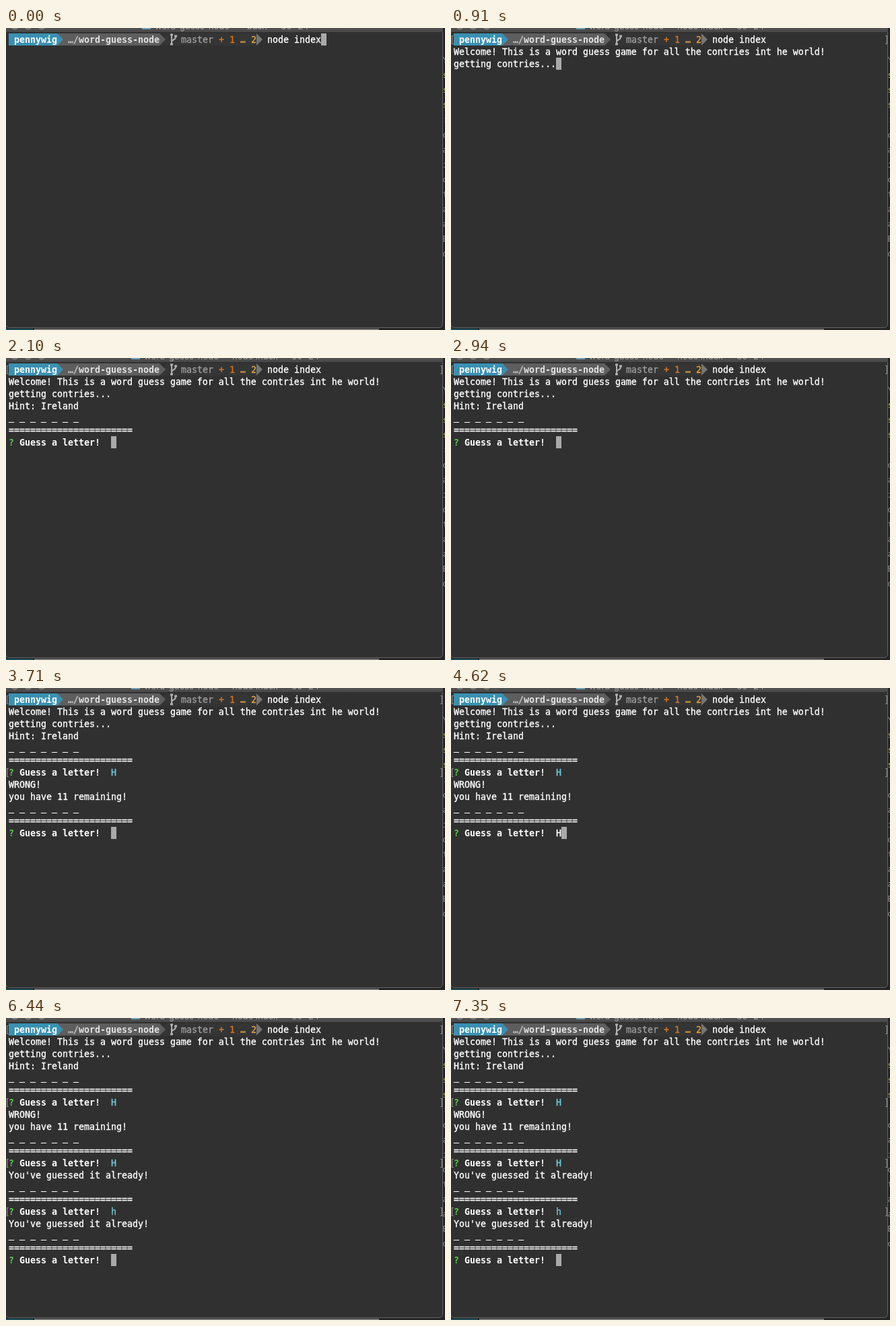
Recreate the animation shown at these times as an HTML page. Size 652x448 px, loop 7420 ms.

```html
<!DOCTYPE html>
<html lang="en">
<head>
<meta charset="utf-8">
<title>Word guess in a terminal</title>
<style>
  html, body { margin: 0; width: 100%; height: 100%; overflow: hidden; background: #242424; }
  #stage { position: relative; width: 652px; height: 448px; overflow: hidden; }
  svg { position: absolute; left: 0; top: 0; }
  .row {
    position: absolute;
    height: 18px;
    font: 13.29px/18px "DejaVu Sans Mono", "Liberation Mono", monospace;
    color: #fff;
    white-space: pre;
    -webkit-text-stroke: 0.35px;
  }
  .mark { color: #8c8c8c; -webkit-text-stroke: 0; }
  .title { font: 13px Inter, "Liberation Sans", sans-serif; fill: #a6a6a6; }
  .behind { font: 13px "DejaVu Sans Mono", monospace; fill: #858585; }
  .behind .key { fill: #aaa548; }
  b { font-weight: bold; -webkit-text-stroke: 0; }
  .blanks { position: relative; top: -2px; }
  .ask { color: #5fc750; }
  .done { color: #72c5d4; }
  .path { color: #c4c4c4; }
  .path b { color: #e2e2e2; }
  .git { color: #9c9c9c; }
  .add { color: #cb742a; }
  .new { color: #e6a63e; }
  #cursor { position: absolute; width: 8px; height: 18px; background: #a9a9a9; }
</style>
</head>
<body>
<div id="stage">
  <svg width="652" height="448" viewBox="0 0 652 448">
    <defs>
      <linearGradient id="bar" x2="0" y2="1">
        <stop stop-color="#525252"/><stop offset="1" stop-color="#484848"/>
      </linearGradient>
    </defs>
    <!-- window behind -->
    <rect width="652" height="448" fill="#242424"/>
    <g class="behind" id="behind"></g>
    <rect y="446" width="40" height="2" fill="#1d4c59"/>
    <rect x="42" y="446" width="512" height="2" fill="#747474"/>
    <!-- terminal window -->
    <path d="M-1-1H648.5V439.5a5 5 0 0 1-5 5H4.5a5 5 0 0 1-5-5Z" fill="#303030" stroke="#646464"/>
    <rect width="649" height="6" fill="url(#bar)"/>
    <g fill="#707070" stroke="#8b8b8b">
      <circle cx="13" cy="-4" r="6"/><circle cx="33" cy="-4" r="6"/><circle cx="53" cy="-4" r="6"/>
    </g>
    <g data-to="350">
      <rect x="202" y="-8" width="13" height="10" fill="#6f9fb6"/>
      <text class="title" x="221" y="2">word-guess-node — -bash — 80×24</text>
    </g>
    <g data-from="350">
      <rect x="186" y="-8" width="13" height="10" fill="#6f9fb6"/>
      <text class="title" x="205" y="2">word-guess-node — node index — 80×24</text>
    </g>
    <!-- prompt segments -->
    <path d="M237 8H372V26H229Z" fill="#353535"/>
    <path d="M372 8L381 17L372 26Z" fill="#757575"/>
    <path d="M76 8H228L237 17L228 26H76Z" fill="#5e5e5e"/>
    <path d="M4 8H76L85 17L76 26H4Z" fill="#3a90b2"/>
    <g fill="none" stroke="#b0b0b0" stroke-width="2">
      <path d="M246 9V25M246 21C246 16 252 19 252 13"/>
      <path d="M244 10H248M244 24H248M250 12H254" stroke-width="3"/>
    </g>
  </svg>
  <div id="cursor"></div>
  <div id="term"></div>
</div>
<script>
const LOOP = 7420, CELL = 8, LINE = 18, LEFT = 4, TOP = 8;
const ENTER = 350, WELCOME = 910, HINT = 1750;
const term = document.getElementById('term');
const cursor = document.getElementById('cursor');
const stops = [];

// Text sits one pixel below the top of its cell.
function put(x, row, html, from = 0, to = LOOP, kind = '') {
  const el = document.createElement('div');
  el.className = 'row ' + kind;
  el.style.left = x + 'px';
  el.style.top = TOP + 1 + LINE * row + 'px';
  el.innerHTML = html;
  el.dataset.from = from;
  el.dataset.to = to;
  term.append(el);
}
const print = (col, row, html, from, to) => put(LEFT + col * CELL, row, html, from, to);
const moveCursor = (time, col, row) => stops.push({ time, col, row });

function bracket(row, from) {
  put(-2, row, '[', from, LOOP, 'mark');
  put(643, row, ']', from, LOOP, 'mark');
}

// Blanks, rule and question; returns the row of the question.
function ask(row, time) {
  print(0, row, '<span class="blanks">_ _ _ _ _ _ _</span>', time);
  print(0, row + 1, '='.repeat(23), time);
  print(0, row + 2, '<b><span class="ask">?</span> Guess a letter!</b>', time);
  moveCursor(time, 19, row + 2);
  return row + 2;
}

function answer(row, letter, typed, sent, reply) {
  print(19, row, letter, typed, sent);
  moveCursor(typed, 20, row);
  print(19, row, `<span class="done">${letter}</span>`, sent);
  bracket(row, sent);
  reply.forEach((text, i) => print(0, row + 1 + i, text, sent));
  return ask(row + 1 + reply.length, sent);
}

print(1, 0, '<b>pennywig</b>');
print(11, 0, '<span class="path">…/<b>word-guess-node</b></span>');
print(32, 0, '<span class="git">master</span> <b class="add">+</b> <span class="add">1</span> <b class="new">…</b> <span class="new">2</span>');
print(48, 0, 'node index');
moveCursor(0, 58, 0);
bracket(0, ENTER);
moveCursor(ENTER, 0, 1);
print(0, 1, 'Welcome! This is a word guess game for all the contries int he world!', WELCOME);
print(0, 2, 'getting contries...', WELCOME);
moveCursor(WELCOME, 19, 2);
print(0, 3, 'Hint: Ireland', HINT);

const again = ["You've guessed it already!"];
let row = ask(4, HINT);
row = answer(row, 'H', 3080, 3430, ['WRONG!', 'you have 11 remaining!']);
row = answer(row, 'H', 4130, 4830, again);
answer(row, 'h', 5670, 6230, again);

// Slivers of text at the right edge.
document.getElementById('behind').innerHTML = [...'Ysss:oaidtaaBd'].map((c, i) =>
  `<text x="648.5" y="${52 + i * 22.1}"${c === 's' ? ' class="key"' : ''}>${c}</text>`).join('');

const timed = [...document.querySelectorAll('[data-from], [data-to]')].map(el => ({
  el, from: +(el.dataset.from || 0), to: +(el.dataset.to || LOOP)
}));

function draw() {
  const t = performance.now() % LOOP;
  for (const { el, from, to } of timed)
    el.style.visibility = t >= from && t < to ? 'visible' : 'hidden';
  const at = stops.filter(s => s.time <= t).pop();
  cursor.style.left = LEFT + at.col * CELL + 'px';
  cursor.style.top = TOP + at.row * LINE + 'px';
  requestAnimationFrame(draw);
}
draw();
</script>
</body>
</html>
```
